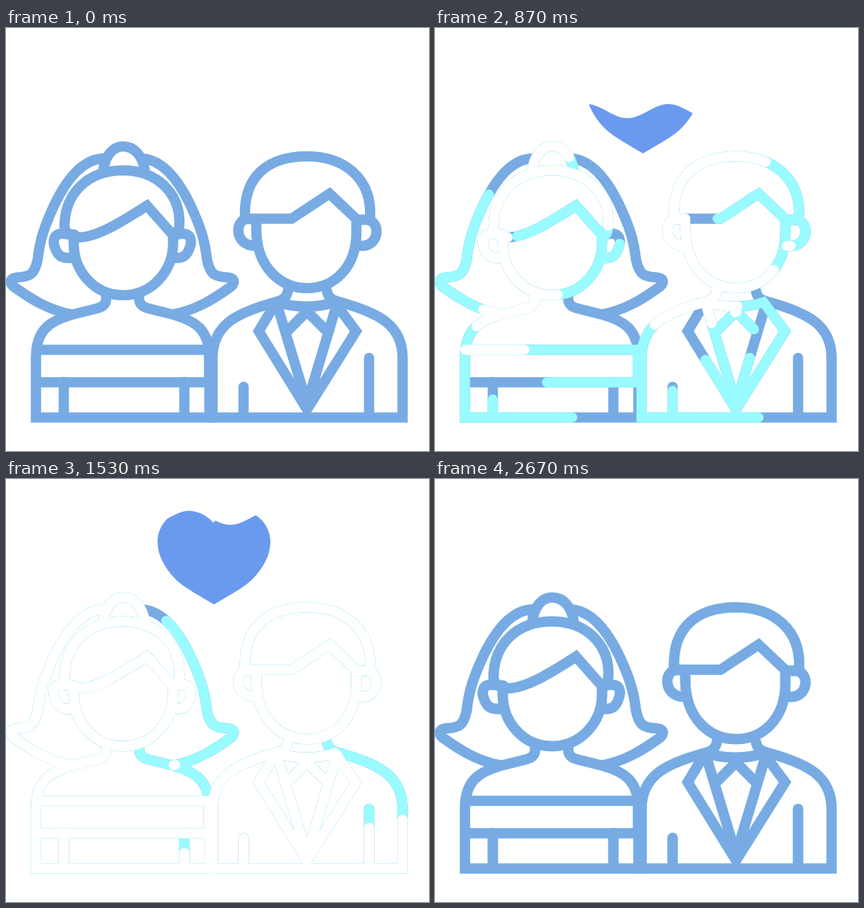
An HTML page that plays this animation: 600 by 600 pixels, repeating every 2700 ms.

```html
<!DOCTYPE html>
<html lang="en">
<head>
<meta charset="utf-8">
<title>Couple and heart</title>
<style>
html, body { margin: 0; width: 100%; height: 100%; overflow: hidden; background: #fff; }
svg { display: block; width: 100vw; height: 100vh; }
.line path { fill: none; stroke-linecap: round; stroke-linejoin: miter; }
</style>
</head>
<body>
<svg viewBox="0 0 600 600">
  <clipPath id="heart"><path d="M295 178C265 160 248 152 234 135C221 119 215 104 215 89C215 63 236 45 257 45C275 45 286 53 294 62C303 53 313 45 332 45C356 45 375 65 375 89C375 104 369 119 356 135C342 152 325 160 295 178Z"/></clipPath>
  <g id="base" class="line" stroke="#78abe3" stroke-width="14.6"></g>
  <g id="cyan" class="line" stroke="#99fbff" stroke-width="14.4"></g>
  <g id="white" class="line" stroke="#fff" stroke-width="14.2"></g>
  <g id="blue" class="line" stroke="#78abe3" stroke-width="14.6"></g>
  <g clip-path="url(#heart)"><path id="wave" fill="#6a9aee"/></g>
</svg>
<script>
const LOOP = 2700, STEP = 30;
const LAG = 420;       // white follows cyan by this much
const SPAN = 1590;     // time cyan needs for all lines
const REDRAW = 2010;   // blue starts to return
const $ = id => document.getElementById(id);
const strokes = [];

function addPath(group, d, flip) {
  const p = document.createElementNS('http://www.w3.org/2000/svg', 'path');
  p.setAttribute('d', d);
  if (flip) p.setAttribute('transform', 'matrix(-1 0 0 1 330 0)');
  $(group).append(p);
  return p;
}

// A line whose tip runs at an even pace from start to end.
function line(start, end, d, flip = false) {
  const total = addPath('base', d, flip).getTotalLength();
  const layers = ['cyan', 'white', 'blue'].map(g => addPath(g, d, flip));
  strokes.push({ start, end, total, layers });
}

// Woman: hair front, fringe, bun, face, ears
line(0, 480, 'M103 297C95 296 83 292 83 282C83 235 115 202 166 202C215 202 246 235 246 275C246 290 243 295 238 295');
line(470, 907, 'M238 295L200 252C165 274 130 297 103 297');
line(150, 530, 'M138 203C140 181 152 168 166 168C182 168 194 181 197 203');
line(0, 870, 'M96 297V305C96 345 125 379 166 379C207 379 237 345 237 305V290');
line(0, 220, 'M97 293L82 292C66 290 66 304 70 313C74 324 80 327 93 326');
line(740, 1000, 'M239 326C250 327 256 324 260 313C264 304 264 290 248 292L238 293');

// Woman: long hair, the right side mirrors the left
const hair = 'M92 406C60 400 35 384 14 369C4 363 5 355 14 354C30 352 40 354 45 328C48 300 55 280 69 250C85 217 108 186 138 185';
line(405, 1025, hair);
line(1107, 1587, hair, true);

// Woman: body, dress bands, arms
line(305, 1350, 'M142 381C143 393 136 396 128 398L92 407C62 416 42.5 428 42.5 468V552.5H288.5V468C288.5 428 269 416 239 407L203 398C195 396 188 393 189 381');
line(345, 1015, 'M43 456.5H288V502.5H43');
line(835, 905, 'M82 552V502');
line(1080, 1150, 'M253 552V502');

// Man: hair, face, ears
line(100, 950, 'M355 270.5H339V262C339 210 372 182 427 182C482 182 516.5 215 516.5 262V272H498L459 235L405 270.5H355');
line(0, 620, 'M355 272V285C355 340 390 369 427 369C465 369 497 340 497 290V272');
line(0, 220, 'M355 271H342C324 272 324 308 352 309');
line(430, 700, 'M499 309H505C530 309 532 274 512 272H498');

// Man: body, collar with lapels, shirt, knot, arms
line(305, 1350, 'M400 372C398 386 388 387 378 390C325 405 293 422 293 468V552.5H562.5V468C562.5 422 530 405 478 390C467 387 457 386 455 372');
line(388, 1000, 'M385 389C410 397 443 397 466 389L496.5 430L427 541L358.5 430L382 391');
line(385, 1050, 'M384 391L427 533L469.5 391');
line(440, 640, 'M427 402L401 428');
line(440, 880, 'M427 402L453 428');
line(805, 880, 'M337 552V509');
line(1035, 1145, 'M515 552V468');

const clamp = v => Math.min(1, Math.max(0, v));

function trim(path, part, total) {
  path.style.visibility = part > 0 ? 'visible' : 'hidden';
  path.setAttribute('stroke-dasharray', part < 1 ? `${part * total} ${total + 20}` : 'none');
}

// The water line rises through the heart, then drains.
function wavePath(t) {
  const rise = 200.8 - 0.0953 * t;
  const level = t < 2040 ? Math.max(rise, 30) : 30 + 165 * clamp((t - 2040) / 600);
  const trough = 366 - 0.107 * t;
  let d = 'M205 200';
  for (let x = 205; x <= 385; x += 3) {
    d += `L${x} ${(level + 10 * Math.cos((x - trough) * 2 * Math.PI / 116)).toFixed(2)}`;
  }
  return d + 'L385 200Z';
}

function render(t) {
  const p = clamp((t - REDRAW) / (LOOP - STEP - REDRAW));
  const clocks = [t, t - LAG, SPAN * (1 - (1 - p) ** 1.75)];
  if (p === 0) clocks[2] = -1;
  for (const { start, end, total, layers } of strokes) {
    layers.forEach((path, i) => trim(path, clamp((clocks[i] - start) / (end - start)), total));
  }
  $('wave').setAttribute('d', wavePath(t));
}

const begin = performance.now();
function tick() {
  const t = (performance.now() - begin) % LOOP;
  render(Math.floor(t / STEP) * STEP);
  requestAnimationFrame(tick);
}
render(0);
requestAnimationFrame(tick);
</script>
</body>
</html>
```
